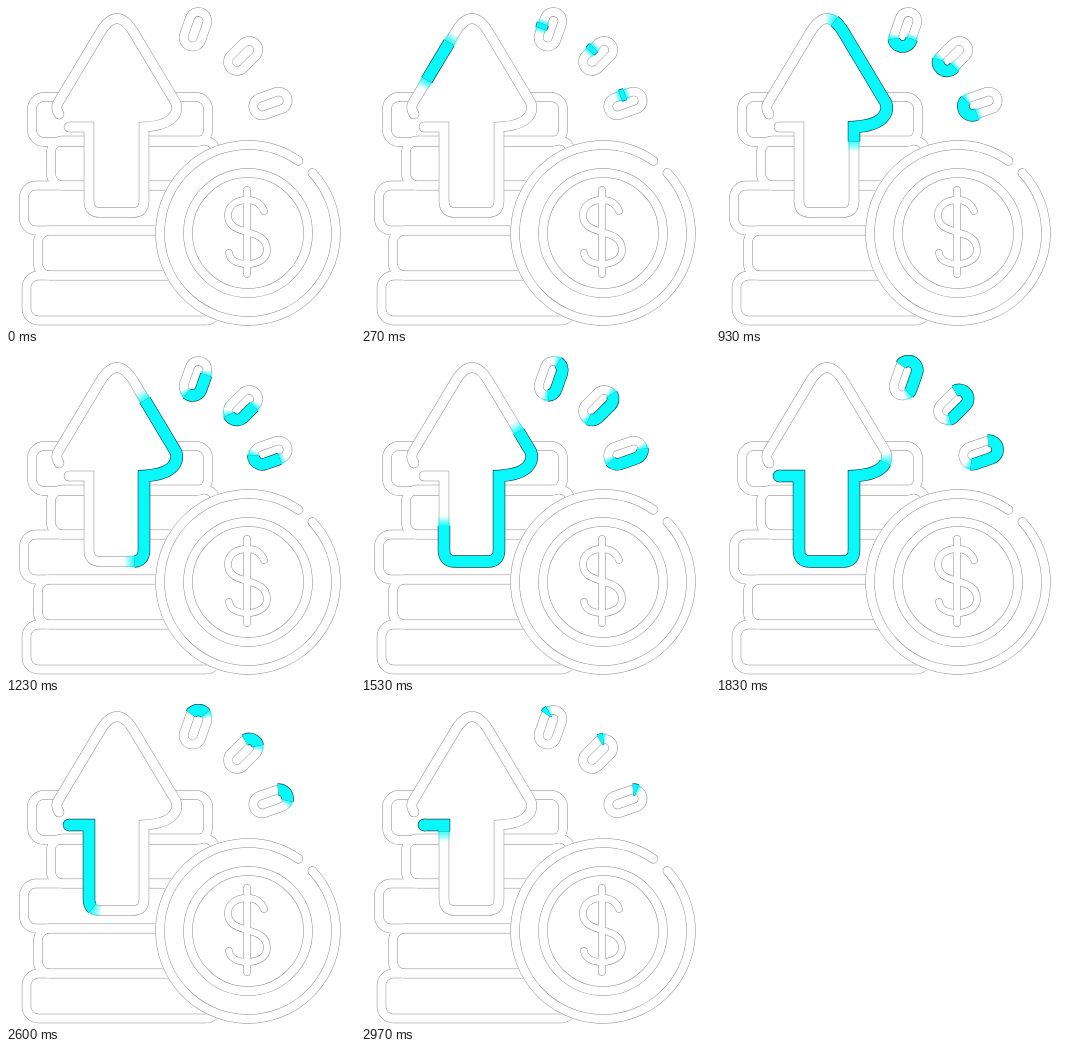
Write an HTML page with a canvas that moves like this. It is 349 by 321 pixels and loops after 3.01 s.

```html
<!DOCTYPE html>
<html lang="en">
<head>
<meta charset="utf-8">
<title>Growing savings</title>
<style>
html, body { margin: 0; width: 100%; height: 100%; overflow: hidden; background: #fff; }
canvas { display: block; width: 349px; height: 321px; }
</style>
</head>
<body>
<canvas id="stage" width="349" height="321"></canvas>
<script>
const ctx = document.getElementById('stage').getContext('2d');
const LOOP = 3010, STEP = LOOP / 90;
const EDGE = '#8c8c8c', BAND = '#fefefe', GLOW = '#08f8fc', RIM = '#06484c';

function track(d, fade, open) {
  const el = document.createElementNS('http://www.w3.org/2000/svg', 'path');
  el.setAttribute('d', d);
  return { path: new Path2D(d), len: el.getTotalLength(), fade, open };
}

// Ring-shaped capsule, traced counterclockwise from its upper end.
function capsule(cx, cy, ux, uy) {
  const r = 9, h = 8.7, px = uy, py = -ux;
  const at = (along, side) =>
    (cx + ux * along + px * side).toFixed(2) + ' ' + (cy + uy * along + py * side).toFixed(2);
  const arc = p => `A${r} ${r} 0 0 0 ${p}`;
  const start = at(h + r * 0.26, r * 0.966);
  return track(`M${start}${arc(at(h, r))}L${at(-h, r)}${arc(at(-h, -r))}L${at(h, -r)}${arc(start)}Z`, 5, false);
}

const arrow = track('M53 108Q49 102 52 97L94.5 26Q111 -1 127.5 26L170 97Q173 107 164 114' +
  'Q156 120 138 121V195Q138 206.5 127 206.5H94Q83 206.5 83 195V121H63', 10, true);
const capsules = [
  capsule(189.5, 23.3, 0.33, -0.944),
  capsule(237, 50, 0.707, -0.707),
  capsule(264.4, 97.5, 0.944, -0.33)
];

function slab(x, y, right) {
  const p = new Path2D();
  p.roundRect(x, y, right - x, 45, 12);
  return p;
}
const slabs = [[26, 91, 202], [45, 134.5, 210], [18, 179.5, 215], [32, 224.5, 215], [20.5, 269.5, 212]]
  .map(s => slab(...s));

function ring(r, from, to) {
  const p = new Path2D();
  p.arc(242, 227, r, from * Math.PI / 180, to * Math.PI / 180);
  return p;
}
const disk = ring(93, 0, 360);
const coin = [ring(88, -43, 305), ring(60, 0, 360)];
const dollar = [new Path2D('M241 184V268'),
  new Path2D('M258 205C255 197 249 194 241 194C230 194 222 200 222 209C222 221 232 223 241 226' +
    'C251 229 261 232 261 244C261 253 252 258 241 258C231 258 224 254 223 247')];

function bands(paths, w) {
  ctx.lineCap = 'round';
  for (const [color, width] of [[EDGE, w + 0.4], [BAND, w - 0.6]]) {
    ctx.strokeStyle = color;
    ctx.lineWidth = width;
    paths.forEach(p => ctx.stroke(p));
  }
}

function blank(path) {
  ctx.fillStyle = '#fff';
  ctx.fill(path);
}

function drawIcon() {
  ctx.clearRect(0, 0, 349, 321);
  bands(slabs, 9);
  blank(disk);
  bands(coin, 9);
  bands(dollar, 7);
  blank(arrow.path);
  bands([arrow.path], 10);
  bands(capsules.map(c => c.path), 9);
}

function piece(t, a, b, color, width) {
  if (b <= a) return;
  ctx.setLineDash([b - a, t.len * 2]);
  ctx.lineDashOffset = -a;
  ctx.strokeStyle = color;
  ctx.lineWidth = width;
  ctx.stroke(t.path);
}

// Lit stretch of a track; its moving ends fade out.
function glow(t, tail, head) {
  const a = tail * t.len, b = head * t.len;
  const half = Math.min(t.fade, (b - a) / 2) / 2, w = 2 * half / t.fade;
  const from = a + half, to = head < 1 ? b - half : t.len;
  ctx.save();
  ctx.lineCap = 'butt';
  for (let i = 0; i < t.fade; i++) {
    const d = w * i - half;
    ctx.globalAlpha = (i + 0.5) / t.fade;
    piece(t, Math.max(0, a + d), a + d + w, GLOW, 11.5);
    if (head < 1) piece(t, b - d - w, b - d, GLOW, 11.5);
  }
  ctx.globalAlpha = 1;
  for (const [color, width] of [[RIM, 12.5], [GLOW, 11.2]]) {
    ctx.lineCap = 'butt';
    piece(t, from, to, color, width);
    if (t.open && head >= 1) {
      ctx.lineCap = 'round';
      piece(t, t.len - 1, t.len, color, width);
    }
  }
  ctx.restore();
}

// Time and share of the path covered.
const TAIL = [[0, 0], [530, 0.131], [930, 0.235], [1530, 0.378], [1830, 0.456], [2270, 0.642], [2970, 0.934], [3010, 0.95]];
const HEAD = [[0, 0], [530, 0.341], [930, 0.565], [1530, 0.866], [1800, 1], [3010, 1]];

function ease(keys, t) {
  let i = 1;
  while (i < keys.length - 1 && t > keys[i][0]) i++;
  const [t0, v0] = keys[i - 1], [t1, v1] = keys[i];
  return v0 + (v1 - v0) * (t - t0) / (t1 - t0);
}

function draw(now) {
  const n = Math.floor((now % LOOP + 8) / STEP) % 90;
  const t = n * STEP;
  drawIcon();
  if (n > 0) {
    const tail = ease(TAIL, t), head = ease(HEAD, t);
    [arrow, ...capsules].forEach(p => glow(p, tail, head));
  }
}

const begin = performance.now();
function tick() {
  draw(performance.now() - begin);
  requestAnimationFrame(tick);
}
tick();
</script>
</body>
</html>
```
